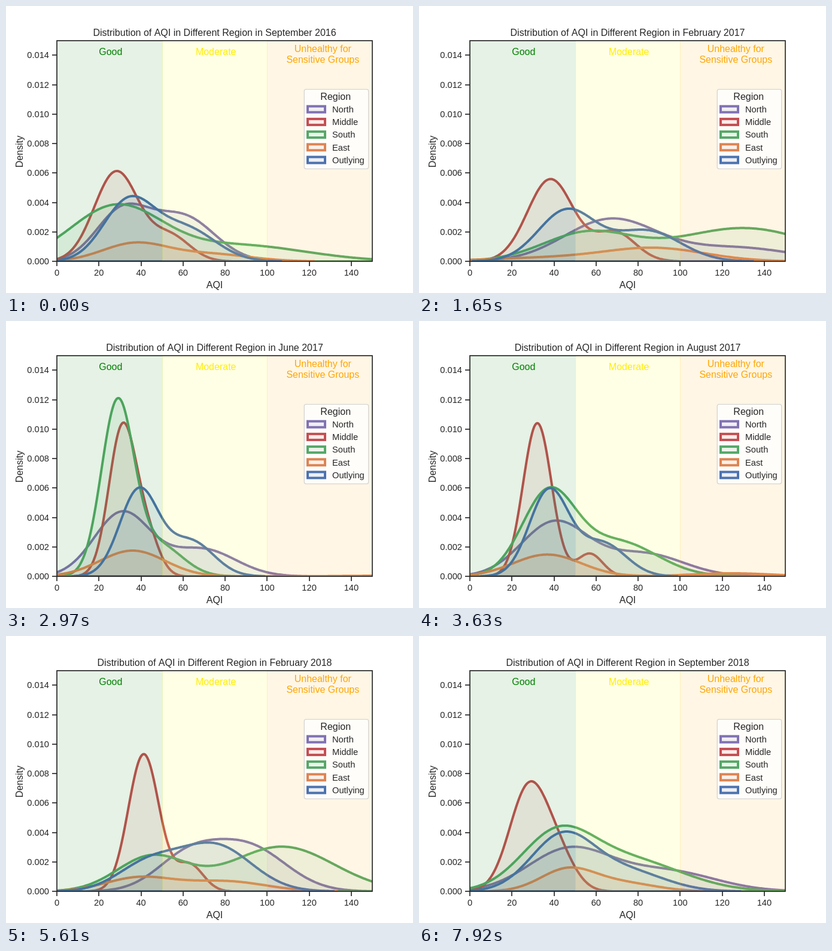
Animation of 680x480 px, one loop 8 s. Source, as an HTML page with a canvas:

```html
<!DOCTYPE html>
<html lang="en">
<head>
<meta charset="utf-8">
<title>AQI distribution by region</title>
<style>
  html, body { margin: 0; width: 100%; height: 100%; overflow: hidden; background: #fff; }
  canvas { display: block; }
</style>
</head>
<body>
<canvas id="stage" width="680" height="480"></canvas>
<script>
const ctx = document.getElementById('stage').getContext('2d');
const LOOP = 8000, STEP = 330;
const LEFT = 85, RIGHT = 612, TOP = 57.6, BOTTOM = 427.2;
const INK = '#262626', ORANGE = '#ffa500';
const MONTHS = ['January', 'February', 'March', 'April', 'May', 'June', 'July',
  'August', 'September', 'October', 'November', 'December'];

const px = aqi => LEFT + aqi * (RIGHT - LEFT) / 150;
const py = density => BOTTOM - density * (BOTTOM - TOP) / 15; // density in thousandths

// A region keeps the same area under its curve all the time. The area is split
// between a main bell and a shoulder bell, whose spread is `widen` times the main one.
// Key months hold [peak, spread, shoulder, share of the shoulder].
const KEY_MONTHS = [0, 5, 9, 14, 17, 20, 24]; // counted from September 2016
const REGIONS = [
  { name: 'North', rgb: '129,114,179', area: 87, widen: 1.2, keys: [
    [31, 12.5, 60, .52], [67, 22, 127, .28], [31, 13.3, 69, .34], [54, 19.5, 103, .33],
    [62, 15, 91, .62], [43, 20, 92, .44], [47, 19.5, 93, .37]] },
  { name: 'Middle', rgb: '196,78,82', area: 80, widen: .9, keys: [
    [28.3, 10.5, 54, .2], [38.3, 10.9, 69, .24], [31.2, 6.5, 43, .18], [33.4, 7.2, 78, .025],
    [41.3, 7.3, 63, .15], [42, 10.8, 23.5, .3], [27.8, 9, 42, .22]] },
  { name: 'South', rgb: '85,168,104', area: 114, widen: 1.5, keys: [
    [28, 21.5, 86, .31], [56, 21.5, 130, .64], [28.8, 7.7, 48, .22], [50, 20, 103, .65],
    [45, 16.5, 107, .66], [37, 13, 74, .33], [41, 17, 75, .48]] },
  { name: 'East', rgb: '221,132,82', area: 28, widen: 1.2, keys: [
    [37, 15.5, 73, .33], [88, 24, 36, .24], [36, 15.5, 150, .03], [38, 17, 86, .32],
    [39, 16, 80, .47], [45, 17, 88, .33], [46.5, 13, 73, .31]] },
  { name: 'Outlying', rgb: '76,114,176', area: 80, widen: 1.2, keys: [
    [34, 12, 61, .4], [46, 13.5, 84, .42], [39, 9.2, 63.5, .33], [35.5, 9.7, 62, .3],
    [43, 14.5, 75, .68], [58.5, 14.8, 104, .11], [44, 15, 75, .3]] }
];

const BANDS = [[0, '0,128,0'], [50, '255,255,0'], [100, '255,165,0']];

const bell = (x, centre, spread) => Math.exp(-(((x - centre) / spread) ** 2) / 2) / spread;

// Returns the density function of a region; months between two keys are blended.
function densityOf({ area, widen, keys }, month) {
  let k = 0;
  while (k < KEY_MONTHS.length - 2 && month >= KEY_MONTHS[k + 1]) k++;
  const mix = (month - KEY_MONTHS[k]) / (KEY_MONTHS[k + 1] - KEY_MONTHS[k]);
  const [peak, spread, shoulder, share] =
    keys[k].map((value, i) => value + (keys[k + 1][i] - value) * mix);
  return x => area * ((1 - share) * bell(x, peak, spread) +
    share * bell(x, shoulder, spread * widen));
}

function text(str, x, y, { size = 16, align = 'center', color = INK } = {}) {
  ctx.font = `${size}px "Liberation Sans", Arial, sans-serif`;
  ctx.textAlign = align;
  ctx.fillStyle = color;
  ctx.fillText(str, x, Math.round(y));
}

function line(x1, y1, x2, y2) {
  ctx.beginPath();
  ctx.moveTo(x1, y1);
  ctx.lineTo(x2, y2);
  ctx.stroke();
}

function setPaint(rgb) {
  ctx.fillStyle = `rgba(${rgb},.1)`;
  ctx.strokeStyle = `rgb(${rgb})`;
  ctx.lineWidth = 4;
}

function drawCurve(region, month) {
  const density = densityOf(region, month);
  const points = [];
  for (let x = -4; x <= 154; x += .5) {
    if (density(x) > .015) points.push([px(x), py(density(x))]);
  }
  ctx.beginPath();
  ctx.moveTo(points[0][0], BOTTOM);
  points.forEach(p => ctx.lineTo(...p));
  ctx.lineTo(points[points.length - 1][0], BOTTOM);
  ctx.closePath();
  setPaint(region.rgb);
  ctx.fill();
  ctx.stroke();
}

function drawBand([from, rgb]) {
  const x = Math.round(px(from)), width = Math.round(px(from + 50)) - x;
  ctx.fillStyle = ctx.strokeStyle = `rgba(${rgb},.1)`;
  ctx.lineWidth = 1;
  ctx.fillRect(x, TOP, width, BOTTOM - TOP);
  ctx.strokeRect(x + .5, TOP, width, BOTTOM - TOP);
}

function drawAxes() {
  ctx.strokeStyle = INK;
  ctx.lineWidth = 1.67;
  ctx.strokeRect(LEFT, 58, RIGHT - LEFT, 369);
  for (let aqi = 0; aqi <= 140; aqi += 20) {
    const x = Math.round(px(aqi));
    line(x, 427, x, 435);
    text(aqi, px(aqi), 451, { size: 14.67 });
  }
  for (let d = 0; d <= 14; d += 2) {
    const y = Math.round(py(d));
    line(77, y, 85, y);
    text((d / 1000).toFixed(3), 72, y + 5, { size: 14.67, align: 'right' });
  }
  text('AQI', 348.5, 472);
  ctx.save();
  ctx.translate(28, 243.5);
  ctx.rotate(-Math.PI / 2);
  text('Density', 0, 0);
  ctx.restore();
}

function drawLegend() {
  ctx.beginPath();
  ctx.roundRect(498.3, 139.3, 107.4, 133, 3);
  ctx.fillStyle = 'rgba(255,255,255,.8)';
  ctx.strokeStyle = 'rgba(204,204,204,.8)';
  ctx.lineWidth = 1.33;
  ctx.fill();
  ctx.stroke();
  text('Region', 550.7, 157);
  REGIONS.forEach(({ name, rgb }, i) => {
    const y = 172.7 + i * 21.2;
    setPaint(rgb);
    ctx.fillRect(504, y - 5, 29, 10);
    ctx.strokeRect(504, y - 5, 29, 10);
    text(name, 545, y + 5.3, { size: 14.67, align: 'left' });
  });
}

function draw(month) {
  ctx.fillStyle = '#fff';
  ctx.fillRect(0, 0, 680, 480);

  ctx.save();
  ctx.beginPath();
  ctx.rect(LEFT, TOP, RIGHT - LEFT, BOTTOM - TOP);
  ctx.clip();
  REGIONS.forEach(region => drawCurve(region, month));
  BANDS.forEach(drawBand);
  ctx.restore();

  drawAxes();
  text('Good', px(20), 82, { align: 'left', color: '#008000' });
  text('Moderate', px(66), 82, { align: 'left', color: '#ffee00' });
  text('Unhealthy for', 529.3, 77, { color: ORANGE });
  text('Sensitive Groups', 529.3, 95, { color: ORANGE });
  drawLegend();

  const calendar = month + 8;
  const date = `${MONTHS[calendar % 12]} ${2016 + Math.floor(calendar / 12)}`;
  text(`Distribution of AQI in Different Region in ${date}`, 348.5, 50);
}

let shown = -1;
function tick() {
  const month = Math.floor(performance.now() % LOOP / STEP);
  if (month !== shown) draw(shown = month);
  requestAnimationFrame(tick);
}
tick();
</script>
</body>
</html>
```
